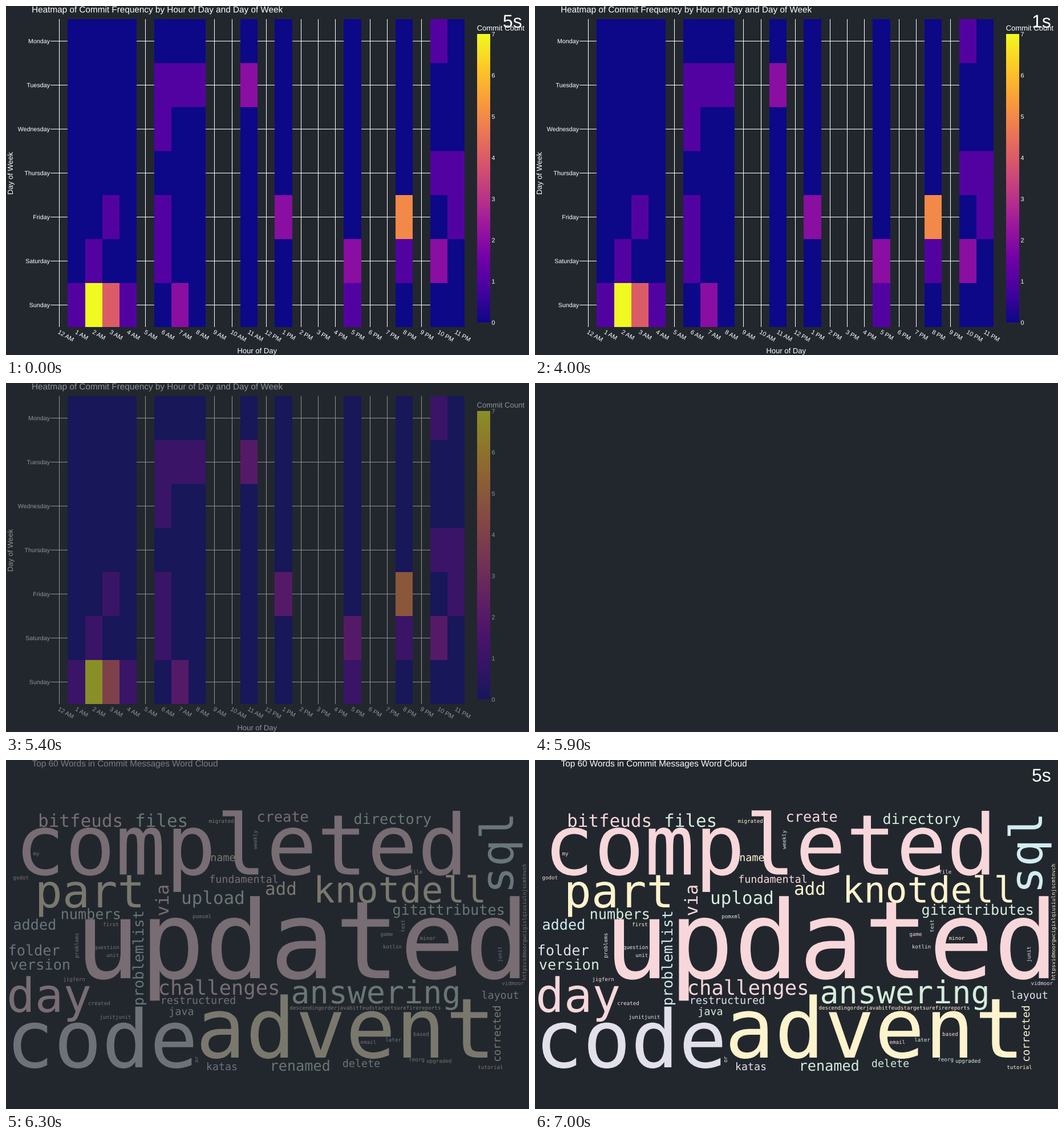
Write a matplotlib script that moves like this. It is 917 px wide and 611 px high and loops after 8000 ms.

```python
import matplotlib.pyplot as plt
import numpy as np
from matplotlib.animation import FuncAnimation
from matplotlib.colors import LinearSegmentedColormap
from matplotlib.patches import PathPatch, Rectangle
from matplotlib.textpath import TextPath
from matplotlib.transforms import Affine2D

W, H, DPI = 917, 611, 64
STEP_MS, FRAMES = 100, 80
BG = "#22272e"
SANS, MONO = "Liberation Sans", "DejaVu Sans Mono"

fig = plt.figure(figsize=(W / DPI, H / DPI), dpi=DPI, facecolor=BG)
ax = fig.add_axes([0, 0, 1, 1])
ax.axis("off")


def rect(x, y, w, h, color, z=1):
    return ax.add_patch(Rectangle((x, y), w, h, fc=color, lw=0, zorder=z))


def text(s, x, y, size, color="white", font=SANS, angle=0, align="left", z=3):
    """Place text by its baseline and its ink edge, or by its pen origin."""
    path = TextPath((0, 0), s, size=size, prop={"family": font})
    box = path.get_extents()
    shift = {"left": box.x0, "right": box.x1, "pen": 0}[align]
    place = (Affine2D().translate(-shift, 0).scale(1, -1)
             .rotate_deg(angle).translate(x, y))
    patch = PathPatch(place.transform_path(path), fc=color, lw=0,
                      zorder=z, snap=False)
    return ax.add_patch(patch)


# ---- heatmap ----
PLASMA = LinearSegmentedColormap.from_list("plasma10", [
    "#0d0887", "#46039f", "#7201a8", "#9c179e", "#bd3786",
    "#d8576b", "#ed7953", "#fb9f3a", "#fdca26", "#f0f921"], N=1024)
LEFT, TOP, COL, ROW = 93.2, 23, 30.25, 77
RIGHT, PEAK = 804, 7
ACTIVE_HOURS = [1, 2, 3, 4, 6, 7, 8, 11, 13, 17, 20, 22, 23]
COMMITS = {
    "Monday": {22: 1},
    "Tuesday": {6: 1, 7: 1, 8: 1, 11: 2},
    "Wednesday": {6: 1},
    "Thursday": {22: 1, 23: 1},
    "Friday": {3: 1, 6: 1, 13: 2, 20: 5, 23: 1},
    "Saturday": {2: 1, 6: 1, 17: 2, 20: 1, 22: 2},
    "Sunday": {1: 1, 2: 7, 3: 4, 4: 1, 7: 2, 17: 1},
}
BAR_X, BAR_W, BAR_TOP, BAR_END = 826, 23, 49, 554
TICK, AXIS, TITLE = 10.7, 13.05, 15.3


def draw_heatmap():
    parts = []
    for hour in range(24):
        x = LEFT + COL * hour
        name = f"{hour % 12 or 12} {'AM' if hour < 12 else 'PM'}"
        parts += [rect(round(x), TOP, 1, 7 * ROW, "white"),
                  text(name, x - 3, 572.8, TICK, angle=30, align="pen")]

    for row, (day, counts) in enumerate(COMMITS.items()):
        y = TOP + ROW * row
        parts += [rect(78, y + 38, RIGHT - 78, 1, "white"),
                  text(day, 77, y + 42.2, TICK, align="right")]
        for hour in ACTIVE_HOURS:
            color = PLASMA(counts.get(hour, 0) / PEAK)
            parts.append(rect(LEFT + COL * (hour - 0.5), y, COL, ROW, color, 2))

    ramp = np.linspace(0, 1, 512)[:, None]
    parts.append(ax.imshow(ramp, cmap=PLASMA, aspect="auto", origin="lower",
                           extent=(BAR_X, BAR_X + BAR_W, BAR_END, BAR_TOP)))
    for n in range(PEAK + 1):
        y = BAR_END + (BAR_TOP - BAR_END) * n / PEAK
        parts.append(text(str(n), 851.5, y + 4, TICK, align="pen"))

    parts += [
        text("Heatmap of Commit Frequency by Hour of Day and Day of Week",
             46.3, 11.3, TITLE),
        text("Commit Count", 826.3, 43, AXIS),
        text("Hour of Day", 406.5, 608, AXIS),
        text("Day of Week", 12, 329.3, AXIS, angle=-90),
    ]
    return parts


# ---- word cloud ----
TINTS = {"p": "#f8d7da", "g": "#d4edda", "y": "#fff3cd",
         "b": "#d1ecf1", "l": "#e2e0eb"}
CLOUD_SCALE = W / 800

# font size: (word, tint, left, baseline)
ACROSS = {
    165: [("updated", "p", 139, 382)],
    128: [("completed", "p", 29, 200.5)],
    127: [("advent", "y", 342, 521)],
    122: [("code", "l", 13, 538)],
    72: [("day", "p", 6, 441)],
    70: [("part", "y", 58, 258)],
    55: [("knotdell", "y", 546, 249.5)],
    48: [("answering", "g", 503, 426)],
    31: [("challenges", "p", 270, 411)],
    27: [("bitfeuds", "p", 59, 117), ("files", "g", 229, 117),
         ("add", "y", 456, 236), ("upload", "g", 310, 252)],
    22: [("create", "p", 442, 108), ("directory", "g", 611, 112),
         ("gitattributes", "g", 679, 271), ("numbers", "g", 98, 278.5),
         ("added", "b", 14, 297), ("folder", "l", 6, 342),
         ("version", "g", 8, 367), ("renamed", "g", 467, 544)],
    16: [("name", "y", 360, 177), ("fundamental", "p", 358, 215),
         ("restructured", "l", 274, 427), ("java", "g", 287, 446.5),
         ("katas", "l", 353, 543), ("delete", "g", 591, 537.5),
         ("layout", "l", 835, 418)],
    8: [("migrated", "y", 356, 110), ("my", "p", 48, 167),
        ("godot", "p", 13, 209), ("file", "p", 709, 199),
        ("first", "y", 171, 291), ("pomxml", "g", 328, 277),
        ("question", "l", 155, 331), ("unit", "l", 177, 345),
        ("game", "p", 657, 308), ("kotlin", "l", 662, 330),
        ("minor", "y", 726, 315), ("jigfern", "p", 101, 387),
        ("created", "p", 145, 429), ("junitjunit", "l", 165, 453),
        ("descendingorderjavabitfeudstargetsurefirereports", "y", 498, 437),
        ("email", "p", 622, 497), ("later", "g", 666, 493),
        ("based", "p", 715, 483), ("reorg", "g", 708, 527.5),
        ("upgraded", "g", 738, 530), ("tutorial", "y", 828, 541),
        ("vidmoor", "l", 870, 394)],
}

# font size: (word, tint, baseline, lower end), reading upwards
UPWARD = {
    69: [("sql", "b", 889, 226)],
    27: [("via", "p", 285, 272)],
    22: [("problemlist", "b", 241, 428)],
    16: [("corrected", "y", 867, 527)],
    8: [("weekly", "g", 440, 156), ("problems", "l", 127, 346),
        ("test", "g", 699, 301), ("junit", "l", 869, 353),
        ("or", "g", 337, 529),
        ("httpsvidmoorgwcigixlqiusiulnjscmtnvch", "y", 912, 385)],
}


def draw_cloud():
    parts = [text("Top 60 Words in Commit Messages Word Cloud",
                  46, 11.3, TITLE)]
    for table, angle in ((ACROSS, 0), (UPWARD, -90)):
        for size, words in table.items():
            parts += [text(word, x, y, size * CLOUD_SCALE, TINTS[tint], MONO, angle)
                      for word, tint, x, y in words]
    return parts


heatmap, cloud = draw_heatmap(), draw_cloud()
timers = {n: text(f"{n}s", 871, 37.7, 32, align="pen", z=5)
          for n in range(1, 6)}
cover = rect(-1, -1, W + 2, H + 2, BG, z=10)
ax.set(xlim=(0, W), ylim=(H, 0))

# timeline, in steps of 100 ms
FADE_OUT, FADE_IN, NEXT, FADE = 50, 60, 70, 10


def update(i):
    if i < FADE_OUT:
        opacity, seconds = 1, 5 - i // 10
    elif i < FADE_IN:
        opacity, seconds = 1 - (i - FADE_OUT + 1) / FADE, None
    elif i < NEXT:
        opacity, seconds = (i - FADE_IN + 1) / FADE, None
    else:
        opacity, seconds = 1, 5 - (i - NEXT) // 10

    for part in heatmap:
        part.set_visible(i < FADE_IN)
    for part in cloud:
        part.set_visible(i >= FADE_IN)
    for n, label in timers.items():
        label.set_visible(n == seconds)
    cover.set_alpha(1 - opacity)
    return []


anim = FuncAnimation(fig, update, frames=FRAMES, interval=STEP_MS,
                     init_func=lambda: update(0), repeat=True, repeat_delay=0)
plt.show()
```
